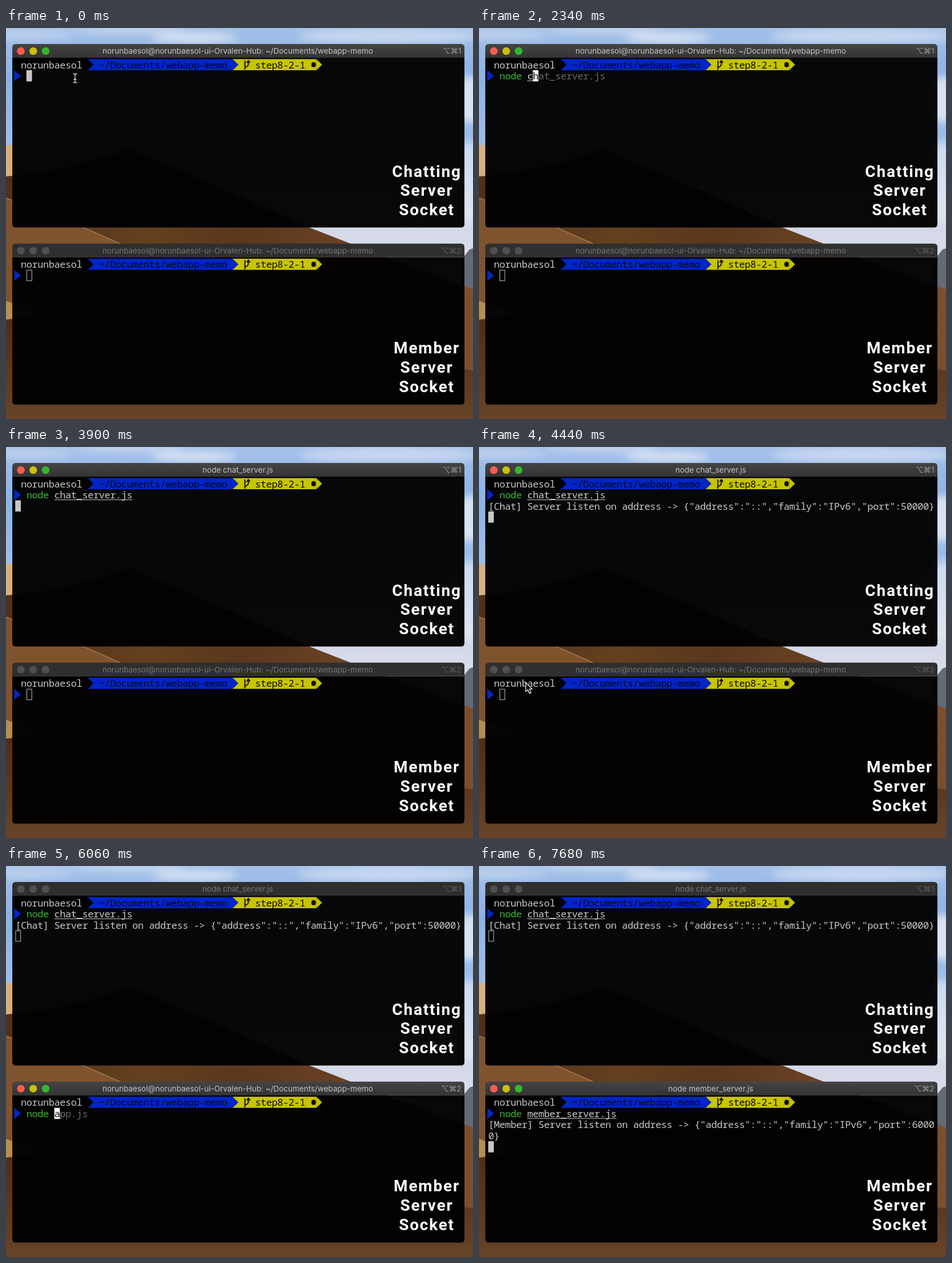
These frames come from a looping animation (818 px wide and 685 px high, 7860 ms). An HTML page:

```html
<!DOCTYPE html>
<html lang="en">
<head>
<meta charset="utf-8">
<title>Two terminals</title>
<style>
  html, body { margin: 0; width: 100%; height: 100%; overflow: hidden; background: #000; }
  svg { display: block; width: 818px; height: 685px; }
  text { white-space: pre; }
  .mono { font: 17px "Noto Sans Mono", monospace; letter-spacing: -.434px; }
  .title { font: 13.5px Inter, "DejaVu Sans", sans-serif; }
  .label { font: 700 28px Roboto, sans-serif; letter-spacing: 1.8px; fill: #fff; text-anchor: middle; }
</style>
</head>
<body>
<svg id="stage" viewBox="0 0 818 685">
  <defs>
    <linearGradient id="sky" x2="0" y2="1">
      <stop offset="0" stop-color="#a3c0e8"/>
      <stop offset=".13" stop-color="#8cb3e6"/>
      <stop offset=".3" stop-color="#9dbfe9"/>
      <stop offset=".5" stop-color="#d3d8e8"/>
      <stop offset=".6" stop-color="#dcdeea"/>
    </linearGradient>
    <linearGradient id="sand" x2="1" y2="0">
      <stop offset="0" stop-color="#4f301a"/>
      <stop offset=".3" stop-color="#64401f"/>
      <stop offset=".5" stop-color="#5b371c"/>
      <stop offset="1" stop-color="#7b4f2f"/>
    </linearGradient>
    <linearGradient id="near" x2="0" y2="1">
      <stop offset="0" stop-color="#4d2d15"/>
      <stop offset="1" stop-color="#684328"/>
    </linearGradient>
    <linearGradient id="bar" x2="0" y2="1">
      <stop offset="0" stop-color="#444"/>
      <stop offset="1" stop-color="#343434"/>
    </linearGradient>
    <filter id="soft" x="-50%" y="-100%" width="200%" height="300%"><feGaussianBlur stdDeviation="7"/></filter>
  </defs>
  <rect width="818" height="685" fill="url(#sky)"/>
  <g fill="#e9eef7" filter="url(#soft)">
    <ellipse cx="330" cy="17" rx="75" ry="9" opacity=".75"/>
    <ellipse cx="215" cy="3" rx="100" ry="7" opacity=".5"/>
    <ellipse cx="30" cy="12" rx="90" ry="9" opacity=".4"/>
    <ellipse cx="670" cy="14" rx="160" ry="14" opacity=".5"/>
    <ellipse cx="815" cy="125" rx="40" ry="40" opacity=".8"/>
    <ellipse cx="815" cy="270" rx="50" ry="70" opacity=".6"/>
  </g>
  <path d="M796 408L812 388L818 386V470H796Z" fill="#666a74"/>
  <path d="M0 205Q90 208 216 211L100 270H0Z" fill="#d8b07c"/>
  <path d="M0 260Q110 252 216 211Q380 280 530 349L640 392L818 458V685H0Z" fill="url(#sand)"/>
  <path d="M0 298Q100 332 200 378L305 470Q308 502 180 503L0 512Z" fill="#80532f"/>
  <path d="M0 298Q100 332 200 378" fill="none" stroke="#a57a4e" stroke-width="1.4"/>
  <path d="M0 478L60 500L0 511Z" fill="#b88d52"/>
  <path d="M0 511L180 503Q308 502 420 540L818 600V685H0Z" fill="url(#near)"/>
  <g id="windows"></g>
  <g id="beam" fill="none" stroke-linecap="round">
    <path d="M-3 -8Q0 -8 0 -5Q0 -8 3 -8M0 -5V5M-3 8Q0 8 0 5Q0 8 3 8M-2 2H2" stroke="#000" stroke-width="3"/>
    <path d="M-3 -8Q0 -8 0 -5Q0 -8 3 -8M0 -5V5M-3 8Q0 8 0 5Q0 8 3 8M-2 2H2" stroke="#e6e6e6" stroke-width="1.3"/>
  </g>
  <path id="arrow" d="M0 0V15.5L3.6 12.2L6.3 18.6L9 17.4L6.3 11.2H11Z" fill="#000" stroke="#fff" stroke-width="1.2"/>
</svg>
<script>
const LOOP = 7860, COL = 9.766, ROW = 19.5, LEFT = 16.2;
const INK = '#c9c9c9', BLUE = '#0225c7', YELLOW = '#c7c400';
const USER = 'norunbaesol', DIR = '~/Documents/webapp-memo';
const HOME = `${USER}@${USER}-ui-Orvalen-Hub: ${DIR}`;
const FOCUS_AT = 4800;

const listen = (name, port) =>
  `[${name}] Server listen on address -> {"address":"::","family":"IPv6","port":${port}}`;

// Each step: time, typed text, greyed completion, phase (0 editing, 1 running, 2 printed)
const terminals = [
  {
    top: 28, height: 321.5, key: 1, label: 'Chatting', labelY: 260.5,
    out: listen('Chat', 50000),
    steps: [
      [0, '', '', 0],
      [480, 'n', 'ode app.js', 0],
      [600, 'no', 'de app.js', 0],
      [720, 'nod', 'e app.js', 0],
      [900, 'node', ' app.js', 0],
      [1320, 'node ', 'app.js', 0],
      [2040, 'node c', '', 0],
      [2280, 'node c', 'hat_server.js', 0],
      [2700, 'node ch', 'at_server.js', 0],
      [3060, 'node cha', 't_server.js', 0],
      [3300, 'node chat', '_server.js', 0],
      [3480, 'node chat_server.js', '', 0],
      [3840, 'node chat_server.js', '', 1],
      [3960, 'node chat_server.js', '', 2]
    ]
  },
  {
    top: 377.7, height: 282, key: 2, label: 'Member', labelY: 570.5,
    out: listen('Member', 60000),
    steps: [
      [0, '', '', 0],
      [5040, 'n', 'ode app.js', 0],
      [5100, 'no', 'de app.js', 0],
      [5220, 'nod', 'e app.js', 0],
      [5340, 'node', ' app.js', 0],
      [6060, 'node ', 'app.js', 0],
      [6180, 'node m', 'ember_server.js', 0],
      [6360, 'node member_server.js', '', 0],
      [6840, 'node member_server.js', '', 1],
      [6960, 'node member_server.js', '', 2]
    ]
  }
];

// Pointer way: time, x, y
const way = [[4080, 121, 88], [4440, 82, 413], [4620, 84, 454], [4740, 92, 489], [5040, 92, 489]];

const $ = id => document.getElementById(id);

function add(parent, tag, attrs, content) {
  const node = document.createElementNS('http://www.w3.org/2000/svg', tag);
  for (const name in attrs) node.setAttribute(name, attrs[name]);
  if (content !== undefined) node.textContent = content;
  parent.append(node);
  return node;
}

const cellX = col => LEFT + col * COL;
const cellY = row => 26.5 + row * ROW;

function write(g, row, col, text, fill = INK) {
  if (text) add(g, 'text', { class: 'mono', x: cellX(col), y: cellY(row) + 16.3, fill }, text);
}

function fillCells(g, row, col, count, fill) {
  add(g, 'rect', { x: cellX(col), y: cellY(row), width: count * COL, height: ROW, fill });
}

function wedge(g, row, x, fill, width = 10) {
  const y = cellY(row);
  add(g, 'path', { d: `M${x} ${y}l${width} ${ROW / 2}l${-width} ${ROW / 2}z`, fill });
}

function drawPrompt(g) {
  fillCells(g, 0, 0, 13, '#000');
  fillCells(g, 0, 13, 26, BLUE);
  fillCells(g, 0, 39, 15, YELLOW);
  wedge(g, 0, cellX(13), '#000');
  wedge(g, 0, cellX(39), BLUE);
  wedge(g, 0, cellX(54), YELLOW);
  wedge(g, 1, 14.5, BLUE, 11.5);
  write(g, 0, 1, USER);
  write(g, 0, 15, DIR, '#05071c');
  write(g, 0, 43, 'step8-2-1', '#0a0a00');
  add(g, 'path', {
    d: 'M418.5 29V45M418.5 41Q424.5 39.5 424.5 35V31M421.5 33L424.5 29L427.5 33',
    fill: 'none', stroke: '#0a0a00', 'stroke-width': 1.9
  });
  add(g, 'rect', { x: 535, y: 31.8, width: 7.5, height: 9, rx: 3.6, fill: '#0a0a00' });
}

function drawFrame(g, term, title, active) {
  const h = term.height;
  add(g, 'path', {
    d: `M11 24H803V${h - 6}q0 6 -6 6H17q-6 0 -6 -6z`, fill: '#000', 'fill-opacity': .965
  });
  add(g, 'path', {
    d: 'M11 24V6q0 -6 6 -6H797q6 0 6 6V24z', fill: active ? 'url(#bar)' : '#2f2f2e'
  });
  ['#ff5b52', '#c9c00c', '#31b92b'].forEach((color, i) =>
    add(g, 'circle', { cx: 26 + i * 21.7, cy: 12.4, r: 6.7, fill: active ? color : '#505050' }));
  add(g, 'text', {
    class: 'title', x: 406, y: 17.3, 'text-anchor': 'middle', fill: active ? '#c4c4c4' : '#747474'
  }, title);
  add(g, 'text', {
    class: 'title', x: 797.5, y: 17.3, 'text-anchor': 'end', fill: active ? '#9a9a9a' : '#5c5c5c'
  }, '⌥⌘' + term.key);
}

function drawCommand(g, typed, hint) {
  const [first, arg = ''] = typed.split(' ');
  const known = first === 'node';
  const [col, word] = known ? [7, arg] : [2, first];
  write(g, 1, 2, first, known ? '#3cb52f' : INK);
  write(g, 1, 7, arg);
  if (word) {
    add(g, 'rect', { x: cellX(col), y: cellY(1) + 18, width: word.length * COL, height: 1, fill: INK });
  }
  write(g, 1, 2 + typed.length, hint, '#686868');
}

function drawCursor(g, row, col, hint, active) {
  const x = cellX(col), y = cellY(row);
  if (!active) {
    add(g, 'rect', {
      x: x + .7, y: y + .5, width: COL - 1, height: ROW - 1, fill: 'none', stroke: '#c0c0c0'
    });
    return;
  }
  add(g, 'rect', { x, y, width: COL, height: ROW, fill: hint ? '#fff' : '#c7c7c7' });
  if (hint) write(g, row, col, hint[0], '#111');
}

function drawTerminal(term, step, active) {
  const [, typed, hint, phase] = step;
  const g = term.group;
  g.replaceChildren();
  drawFrame(g, term, phase ? typed : HOME, active);
  drawPrompt(g);
  drawCommand(g, typed, hint);
  const lines = phase === 2 ? term.out.match(/.{1,80}/g) : [];
  lines.forEach((line, i) => write(g, 2 + i, 0, line));
  if (phase) drawCursor(g, 2 + lines.length, 0, '', active);
  else drawCursor(g, 1, 2 + typed.length, hint, active);
  [term.label, 'Server', 'Socket'].forEach((word, i) =>
    add(g, 'text', { class: 'label', x: 737, y: term.labelY - term.top + i * 33.7 }, word));
}

function pointerAt(t) {
  if (t < 480) return [121, 88];
  const i = way.findIndex(([time], k) => k && t < time);
  if (t < way[0][0] || i < 0) return null;
  const [t0, x0, y0] = way[i - 1], [t1, x1, y1] = way[i];
  const p = (t - t0) / (t1 - t0), e = p * p * (3 - 2 * p);
  return [x0 + (x1 - x0) * e, y0 + (y1 - y0) * e];
}

function drawPointer(t) {
  const pos = pointerAt(t);
  const overText = pos && pos[1] < 350;
  $('beam').style.display = overText ? '' : 'none';
  $('arrow').style.display = pos && !overText ? '' : 'none';
  if (pos) $(overText ? 'beam' : 'arrow').setAttribute('transform', `translate(${pos})`);
}

for (const term of terminals) {
  term.group = add($('windows'), 'g', { transform: `translate(0 ${term.top})` });
}

function render(t) {
  terminals.forEach((term, i) => {
    const step = term.steps.findLast(([time]) => time <= t);
    const active = (t >= FOCUS_AT) === (i === 1);
    if (step === term.step && active === term.active) return;
    Object.assign(term, { step, active });
    drawTerminal(term, step, active);
  });
  drawPointer(t);
}

const start = performance.now();
function tick() {
  render((performance.now() - start) % LOOP);
  requestAnimationFrame(tick);
}
tick();
</script>
</body>
</html>
```
